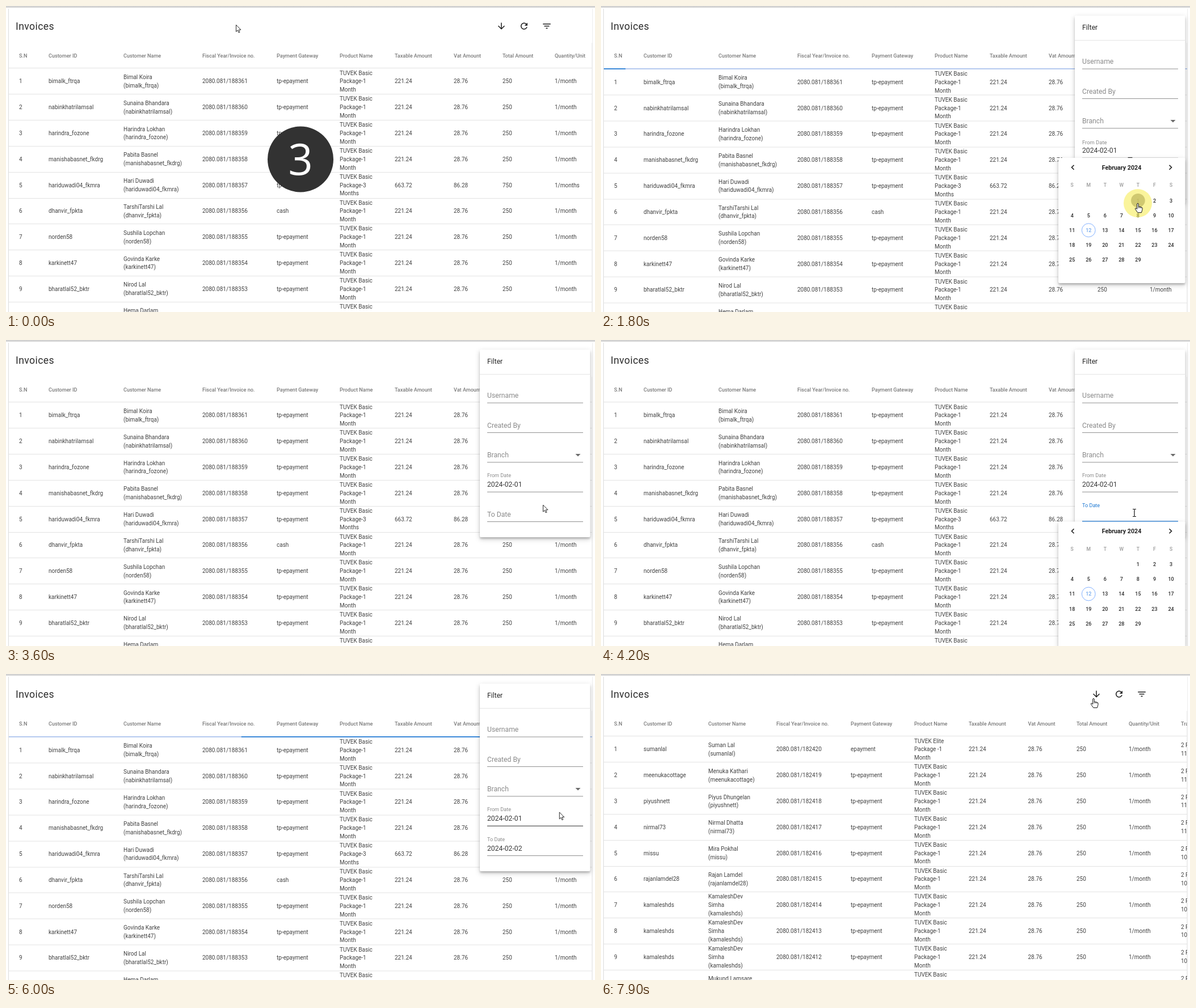
Animation, 1038 px wide and 540 px high, one loop 8000 ms. Source, as an HTML page:

```html
<!DOCTYPE html>
<html lang="en">
<head>
<meta charset="utf-8">
<title>Invoices</title>
<style>
html, body { margin: 0; width: 100%; height: 100%; overflow: hidden; background: #fff; }
svg { display: block; width: 1038px; height: 540px; font-family: Roboto, "Open Sans", sans-serif; }
.menu { filter: drop-shadow(0 3px 1.6px rgba(0,0,0,.17)) drop-shadow(0 3px 4.5px rgba(0,0,0,.2)); }
</style>
</head>
<body>
<svg id="stage" viewBox="0 0 1038 540">
  <defs>
    <linearGradient id="bar" x1="0" y1="0" x2="0" y2="1">
      <stop offset="0" stop-color="#e2e2e2"/><stop offset=".3" stop-color="#c4c4c4"/><stop offset="1" stop-color="#fff"/>
    </linearGradient>
    <clipPath id="card"><rect x="5" y="0" width="1028" height="540"/></clipPath>
  </defs>
  <rect width="1038" height="540" fill="#fff"/>
  <rect x="4.5" y="5.5" width="1028.5" height="560" fill="#fff" stroke="#dcdcdc"/>
  <rect x="5" y="5" width="1028" height="60" fill="#fff"/>
  <rect width="1038" height="4" fill="url(#bar)"/>
  <g id="top"></g>
  <g id="tables" clip-path="url(#card)"></g>
  <g id="loader"></g>
  <g id="panel" class="menu"></g>
  <g id="fromCal" class="menu"></g>
  <g id="toCal" class="menu"></g>
  <g id="count"></g>
  <circle id="pulse" fill="#f5ea3c"/>
  <g id="cursor"></g>
</svg>
<script>
const LOOP = 8000, STEP = 100;
const BLUE = '#1976d2', INK = '#424242', GREY = '#8a8a8a';
const $ = id => document.getElementById(id);
const clamp = v => Math.max(0, Math.min(1, v));

function bezier(x1, y1, x2, y2) {
  const at = (s, a, b) => 3 * (1 - s) * (1 - s) * s * a + 3 * (1 - s) * s * s * b + s * s * s;
  return x => {
    if (x <= 0) return 0;
    if (x >= 1) return 1;
    let lo = 0, hi = 1;
    for (let i = 0; i < 24; i++) {
      const mid = (lo + hi) / 2;
      if (at(mid, x1, x2) < x) lo = mid; else hi = mid;
    }
    return at(lo, y1, y2);
  };
}
const ease = bezier(.25, .1, .25, 1);
const swift = bezier(.25, .8, .5, 1);
const smooth = bezier(.4, 0, .4, 1);
const since = (t, start) => swift((t - start) / 300);

// text placed by the middle of its capital height
function text(x, cy, str, size = 10, fill = INK, attrs = '') {
  return `<text x="${x}" y="${(cy + size * .36).toFixed(2)}" font-size="${size}" fill="${fill}" ${attrs}>${str}</text>`;
}
const line = (x1, x2, y, color, w = 1) =>
  `<path d="M${x1} ${y}H${x2}" stroke="${color}" stroke-width="${w}"/>`;
const icon = (x, y, d) =>
  `<path transform="translate(${x} ${y}) scale(.75) translate(-12 -12)" d="${d}" fill="#1c1c1c"/>`;

$('top').innerHTML =
  text(17, 35.3, 'Invoices', 17.6, '#2c2c2c', 'letter-spacing=".4"') +
  icon(873, 35.5, 'M20 12l-1.41-1.41L13 16.17V4h-2v12.17l-5.58-5.59L4 12l8 8 8-8z') +
  icon(913, 35.5, 'M17.65 6.35C16.2 4.9 14.21 4 12 4c-4.42 0-7.99 3.58-7.99 8s3.57 8 7.99 8c3.73 0 6.84-2.55 7.73-6h-2.08c-.82 2.33-3.04 4-5.65 4-3.31 0-6-2.69-6-6s2.69-6 6-6c1.66 0 3.14.69 4.22 1.78L13 11h7V4l-2.35 2.35z') +
  icon(953, 35.5, 'M10 18h4v-2h-4v2zM3 6v2h18V6H3zm3 7h12v-2H6v2z');

// tables
const HEADS = ['S.N', 'Customer ID', 'Customer Name', 'Fiscal Year/Invoice no.', 'Payment Gateway',
  'Product Name', 'Taxable Amount', 'Vat Amount', 'Total Amount', 'Quantity/Unit', 'Transaction Date'];

const before = {
  cols: [23, 75, 207, 346, 477, 588, 685, 789, 875, 967],
  invoice: 188361,
  people: ['bimalk_ftrqa|Bimal Koira', 'nabinkhatrilamsal|Sunaina Bhandara', 'harindra_fozone|Harindra Lokhan',
    'manishabasnet_fkdrg|Pabita Basnel', 'hariduwadi04_fkmra|Hari Duwadi', 'dhanvir_fpkta|TarshiTarshi Lal',
    'norden58|Sushila Lopchan', 'karkinett47|Govinda Karke', 'bharatlal52_bktr|Nirod Lal', 'hemadarlam|Hema Darlam'],
  gateway: i => i === 5 ? 'cash' : 'tp-epayment',
  product: i => ['TUVEK Basic', i === 4 ? 'Package-3' : 'Package-1', i === 4 ? 'Months' : 'Month'],
  sums: i => i === 4 ? ['663.72', '86.28', '750', '1/months'] : ['221.24', '28.76', '250', '1/month']
};
const after = {
  cols: [23, 75, 189, 309, 440, 552, 648, 752.5, 838, 930, 1022],
  invoice: 182420,
  people: ['sumanlal|Suman Lal', 'meenukacottage|Menuka Kathari', 'piyushnett|Piyus Dhungelan', 'nirmal73|Nirmal Dhatta',
    'missu|Mira Pokhal', 'rajanlamdel28|Rajan Lamdel', 'kamaleshds|KamaleshDev|Simha', 'kamaleshds|KamaleshDev|Simha',
    'kamaleshds|KamaleshDev|Simha', 'mukund61|Mukund Lamsare'],
  gateway: i => i ? 'tp-epayment' : 'epayment',
  product: i => i ? ['TUVEK Basic', 'Package-1', 'Month'] : ['TUVEK Elite', 'Package -1', 'Month'],
  sums: () => ['221.24', '28.76', '250', '1/month'],
  date: i => ['2 Feb 2024', (i < 4 ? 11 : 10) + ':24 AM']
};

function tableMarkup(id, d) {
  const head = d.cols.map((x, i) => text(x, 87.8, HEADS[i], 9.1, '#7a7a7a', 'font-weight="500"')).join('');
  let body = '';
  d.people.forEach((p, i) => {
    const [user, ...name] = p.split('|');
    const cy = 132.7 + 45.82 * i;
    const cells = [[i + 1], [user], [...name, `(${user})`], ['2080.081/' + (d.invoice - i)], [d.gateway(i)],
      d.product(i), ...d.sums(i).map(s => [s])];
    if (d.date) cells.push(d.date(i));
    cells.forEach((lines, c) => lines.forEach((s, k) => {
      body += text(d.cols[c], cy + (k - (lines.length - 1) / 2) * 14.8, s);
    }));
    body += line(5, 1033, Math.round(cy + 22.6) + .5, '#e3e3e3');
  });
  return `<g id="${id}">${head}<g id="${id}Body">${body}</g></g>`;
}
$('tables').innerHTML = tableMarkup('before', before) + tableMarkup('after', after);

// calendars are drawn with their top left corner at 0,0
function calendar(picked) {
  const { day, fill, ink } = picked;
  const colX = c => 24.2 + 29.05 * c;
  const mid = 'text-anchor="middle" font-weight="500"';
  let s = '<rect width="223.5" height="221" rx="2" fill="#fff"/>' +
    '<path d="M27.5 12.8l-4 4 4 4M195.5 12.8l4 4-4 4" fill="none" stroke="#1c1c1c" stroke-width="1.6"/>' +
    text(111.5, 17, 'February 2024', 10.7, '#222', 'text-anchor="middle" font-weight="700"');
  [...'SMTWTFS'].forEach((w, c) => s += text(colX(c), 48.3, w, 8.6, '#9b9b9b', mid));
  for (let n = 1; n <= 29; n++) {
    const slot = n + 3, x = colX(slot % 7), y = 75.3 + 26.2 * Math.floor(slot / 7);
    let color = '#2a2a2a';
    if (n === 12) {
      s += `<circle cx="${x}" cy="${y}" r="11.9" fill="none" stroke="#82b1ff"/>`;
      color = '#6fa6ec';
    }
    if (n === day) {
      s += `<circle cx="${x}" cy="${y}" r="12.3" fill="${fill}"/>`;
      color = ink;
    }
    s += text(x, y, n, 9, color, mid);
  }
  return s;
}

// scaled menu between its opening and closing times
function menu(id, t, open, close, x, y) {
  const k = t < close ? since(t, open) : 1 - since(t, close);
  const g = $(id);
  g.style.display = k > 0 ? '' : 'none';
  g.setAttribute('opacity', k.toFixed(3));
  g.setAttribute('transform', `translate(${x} ${y}) scale(${k.toFixed(4)})`);
}

function field(label, cy, pos, o = {}) {
  const { lift = 0, value = '', focus = false, ripple = 0 } = o;
  const under = cy + 13.2;
  const hover = pos.x > 848 && pos.x < 1017 && pos.y > cy - 12 && pos.y < under;
  const w = 169 * ripple / 2;
  return line(848, 1017, under, hover ? '#2a2a2a' : '#8f8f8f') +
    text(848, cy - 15.8 * lift, label, 12.2 - 3.1 * lift, focus ? BLUE : GREY) +
    (value && text(848, cy, value, 12.2, '#3a3a3a')) +
    (ripple > 0 ? line(932.5 - w, 932.5 + w, under - .4, focus ? BLUE : '#222', 1.8) : '');
}

function dateField(label, cy, t, pos, start, set, value) {
  const blur = set - 130;
  const dip = .24 * clamp((t - set + 70) / 70) * (1 - since(t, set));
  return field(label, cy, pos, {
    lift: since(t, start) - dip,
    value: t >= set ? value : '',
    focus: t >= start && t < blur,
    ripple: t < blur ? since(t, start) : 1 - since(t, blur)
  });
}

const FROM_SET = 1732, TO_SET = 5367;

function drawPanel(t, pos) {
  $('panel').innerHTML = '<g transform="translate(-835 -17)">' +
    '<rect x="835" y="17" width="194.5" height="331" rx="2" fill="#fff"/>' +
    text(848, 38, 'Filter', 12.2, '#2a2a2a') + line(835, 1029.5, 60.5, '#e4e4e4') +
    field('Username', 97.8, pos) + field('Created By', 150.2, pos) + field('Branch', 202.6, pos) +
    '<path d="M1003.5 201h9l-4.5 4.5z" fill="#6b6b6b"/>' +
    dateField('From Date', 255, t, pos, 690, FROM_SET, '2024-02-01') +
    dateField('To Date', 307.4, t, pos, 3870, TO_SET, '2024-02-02') + '</g>';
}

function drawLoader(t) {
  const start = t >= FROM_SET && t < 2750 ? FROM_SET : t >= TO_SET && t < 6400 ? TO_SET : 0;
  const shift = start ? 1.5 : 0;
  $('beforeBody').setAttribute('transform', `translate(0 ${shift})`);
  if (!start) {
    $('loader').innerHTML = line(5, 1033, 109.5, '#e3e3e3');
    return;
  }
  const e = ease((Math.min(t, 6200) - start) / 1320);
  const a = 5 + 1028 * clamp(-2 + 3.07 * e), b = 5 + 1028 * clamp(1.08 * e);
  $('loader').innerHTML = '<rect x="5" y="110" width="1028" height="1.6" fill="#a3bdec"/>' +
    `<rect x="${a}" y="110" width="${Math.max(0, b - a)}" height="1.6" fill="${BLUE}"/>`;
}

// pointer
const PATH = [[50, 405, 33], [350, 948, 33], [400, 948, 33], [640, 932, 252], [1100, 932, 252], [1560, 946, 348],
  [2200, 946, 348], [2880, 971, 232], [3300, 971, 232], [3790, 940, 305], [4620, 940, 305], [5240, 973, 397],
  [5530, 973, 397], [6190, 975, 227], [6930, 975, 227], [7200, 779, 46], [7560, 779, 46], [7890, 868, 43]];
const CLICKS = [350, 660, 1650, 2950, 3850, 5300, 7350];
const HAND = [[330, 420], [1420, 2350], [4950, 5365], [7790, 8000]];
const BEAM = [[620, 1250], [3700, 4700]];
const inside = (list, t) => list.some(([a, b]) => t >= a && t < b);

function pointAt(t) {
  const i = PATH.findIndex(k => k[0] > t);
  if (i === 0) return { x: PATH[0][1], y: PATH[0][2] };
  const [t0, x0, y0] = PATH[i < 0 ? PATH.length - 1 : i - 1];
  if (i < 0) return { x: x0, y: y0 };
  const [t1, x1, y1] = PATH[i];
  const k = smooth((t - t0) / (t1 - t0));
  return { x: x0 + (x1 - x0) * k, y: y0 + (y1 - y0) * k };
}

const SHAPES = {
  arrow: '<path d="M.5 .3V12.3L3.3 9.7 5.1 14 7 13.2 5.2 9H9z" fill="#fff" stroke="#111" stroke-width=".9"/>',
  hand: '<path d="M-1.3 1Q0 -.8 1.2 1V6L4 6.4 6.6 7.2Q8.4 7.7 8.2 9.6L7.6 12.8 6.4 16.6H-.2L-3.8 11.4Q-5 9.5-4.2 8.8-3 8.2-1.3 10.4Z" fill="#fff" stroke="#111" stroke-linejoin="round"/>' +
    '<path d="M1.2 6V9M3.8 6.4V9M6.1 7.2V9.2" stroke="#111" stroke-width=".8"/>',
  beam: '<path d="M-3 -6.5H-.8L0 -6 .8-6.5H3M0 -6V6M-3 6.5H-.8L0 6 .8 6.5H3" fill="none" stroke="#111" stroke-width="1.2"/>'
};

function drawPointer(t, pos) {
  const kind = inside(HAND, t) ? 'hand' : inside(BEAM, t) ? 'beam' : 'arrow';
  $('cursor').innerHTML = SHAPES[kind];
  $('cursor').setAttribute('transform', `translate(${pos.x.toFixed(2)} ${pos.y.toFixed(2)})`);
  const click = CLICKS.find(c => t >= c && t - c <= 300);
  const pulse = $('pulse');
  pulse.style.display = click ? '' : 'none';
  if (!click) return;
  const age = t - click, spot = pointAt(click);
  pulse.setAttribute('cx', spot.x);
  pulse.setAttribute('cy', spot.y);
  pulse.setAttribute('r', Math.min(31, 10 + age / 10));
  pulse.setAttribute('opacity', .96 - age * .003);
}

function firstPick(t) {
  if (t < 1450) return {};
  if (t < FROM_SET) return { day: 1, fill: '#dedede', ink: '#222' };
  if (t < 1900) return { day: 1, fill: '#aaa8a8', ink: '#8a8888' };
  return { day: 1, fill: '#82b1ff', ink: '#fff' };
}

$('count').innerHTML = '<circle cx="519" cy="270.5" r="58" fill="#323232"/>' +
  '<text x="519" y="297.5" font-size="76" fill="#fff" text-anchor="middle" style="font-family:\'Open Sans\',\'Noto Sans\',sans-serif">3</text>';

function draw(t) {
  const pos = pointAt(t);
  $('count').style.display = t < 100 ? '' : 'none';
  $('before').style.display = t < 6400 ? '' : 'none';
  $('after').style.display = t < 6400 ? 'none' : '';
  drawLoader(t);
  drawPanel(t, pos);
  menu('panel', t, 380, 7370, 835, 17);
  $('fromCal').innerHTML = calendar(firstPick(t));
  menu('fromCal', t, 700, 2960, 806, 268);
  $('toCal').innerHTML = calendar(t >= 5100 ? { day: 2, fill: '#dedede', ink: '#222' } : {});
  menu('toCal', t, 3880, TO_SET, 806, 320.4);
  drawPointer(t, pos);
}

let last = -1;
const begin = performance.now();
function tick() {
  const t = Math.floor(((performance.now() - begin) % LOOP) / STEP) * STEP;
  if (t !== last) draw(last = t);
  requestAnimationFrame(tick);
}
tick();
</script>
</body>
</html>
```
